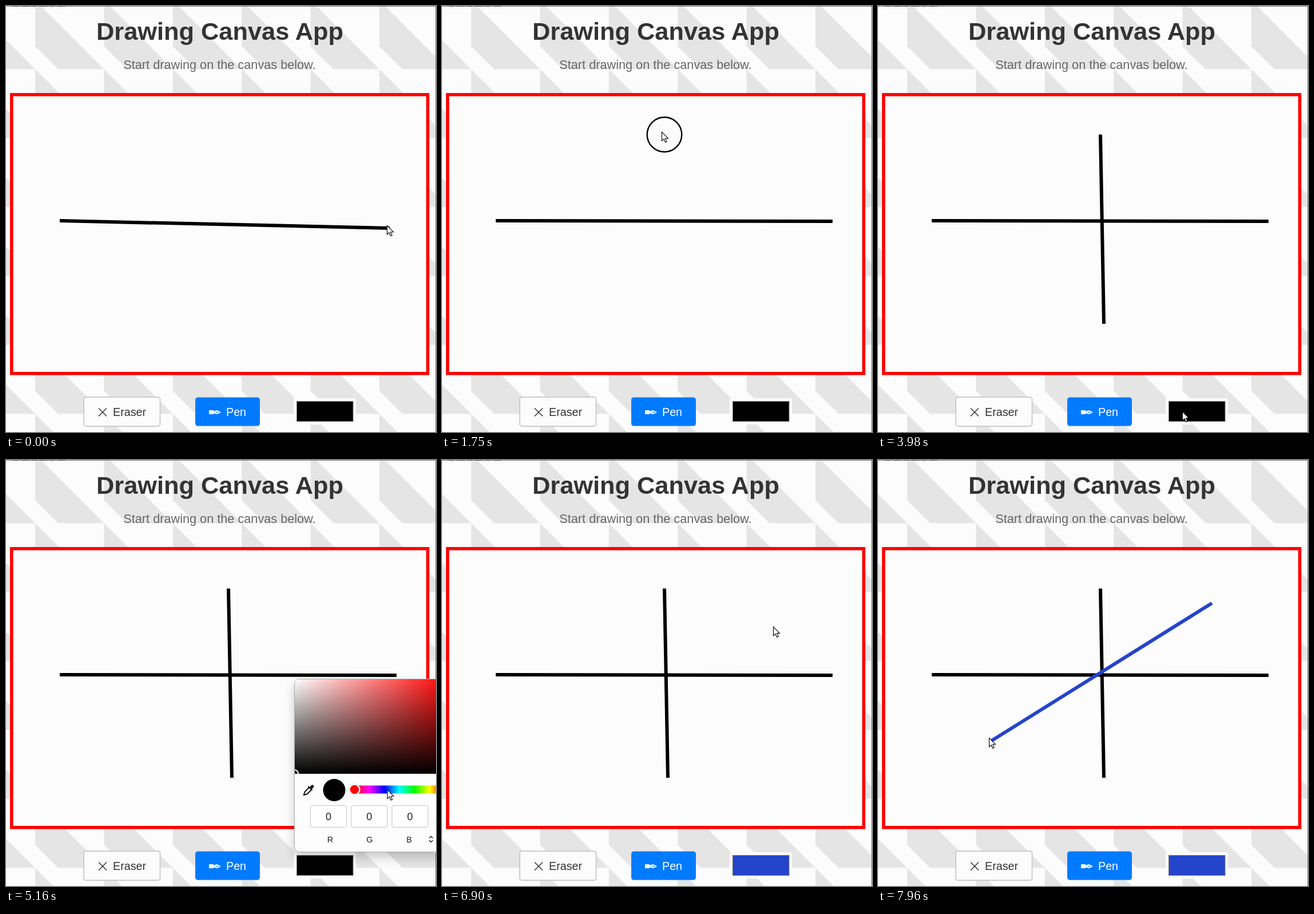
Animation, 752 px wide and 744 px high, one loop 8000 ms. Source, as an HTML page:

```html
<!DOCTYPE html>
<html lang="en">
<head>
<meta charset="utf-8">
<title>Drawing Canvas App</title>
<style>
  html, body { margin: 0; width: 100%; height: 100%; overflow: hidden; background: #fcfcfc; }
  svg { display: block; width: 100vw; height: 100vh; font-family: "Liberation Sans", Arial, sans-serif; }
  .mid { text-anchor: middle; }
  .stroke { fill: none; stroke: #000; stroke-width: 6; }
  .field { fill: #fff; stroke: #c2c2c2; }
</style>
</head>
<body>
<svg viewBox="0 0 752 744">
  <defs>
    <pattern id="tiles" x="51" y="110.3" width="120.4" height="120.4" patternUnits="userSpaceOnUse">
      <path d="M0 0L120.4 120.4H40.1L0 80.3Z" fill="#e5e5e5"/>
    </pattern>
    <linearGradient id="toWhite">
      <stop stop-color="#fff"/><stop offset="1" stop-color="#fff" stop-opacity="0"/>
    </linearGradient>
    <linearGradient id="toBlack" x2="0" y2="1">
      <stop stop-opacity="0"/><stop offset="1"/>
    </linearGradient>
    <linearGradient id="hues"></linearGradient>
    <clipPath id="shadeClip"><path d="M505 548V391Q505 383 513 383H777V548Z"/></clipPath>
    <filter id="shadow" x="-20%" y="-20%" width="140%" height="140%">
      <feDropShadow dx="0" dy="9" stdDeviation="9" flood-opacity=".2"/>
    </filter>
  </defs>

  <rect width="752" height="744" fill="#fcfcfc"/>
  <rect width="752" height="744" fill="url(#tiles)"/>
  <path d="M0 .5H752M751.5 0V744" stroke="#777"/>
  <path d="M12 .5H105" stroke="#333" stroke-dasharray="9 5 14 4"/>
  <text class="mid" x="374" y="59" font-size="43.35" font-weight="700" fill="#333">Drawing Canvas App</text>
  <text class="mid" x="373.5" y="110" font-size="21.7" fill="#666">Start drawing on the canvas below.</text>

  <rect x="9.8" y="154.8" width="727.8" height="487" fill="#fcfcfc" stroke="#f00" stroke-width="5.6"/>
  <path id="across" class="stroke"/>
  <path id="down" class="stroke"/>
  <path id="slant" class="stroke" style="stroke:#2444cb"/>

  <g font-size="19.7">
    <rect x="136" y="683" width="133.5" height="51" rx="4" fill="#fcfcfc" stroke="#ccc" stroke-width="2"/>
    <path d="M162 702.5l14 14m0-14l-14 14" stroke="#333" stroke-width="1.5"/>
    <text x="187" y="716" fill="#333">Eraser</text>
    <rect x="331" y="683.5" width="113" height="50" rx="4.5" fill="#007bff"/>
    <path d="M355 706H363V708L368 706Q373 707 376 709.5Q373 712 368 713L363 711V713H355Z" fill="#fff"/>
    <path d="M367 709.5H373" stroke="#007bff"/>
    <text x="385" y="716" fill="#fff">Pen</text>
  </g>
  <rect x="503" y="685" width="109" height="46" rx="4" fill="#fcfcfc"/>
  <rect id="swatch" x="508.5" y="690.5" width="98.5" height="35" stroke="#767676"/>

  <g id="picker">
    <rect x="504.5" y="382.5" width="273" height="302" rx="9" fill="#fdfdfd" stroke="#aaa" filter="url(#shadow)"/>
    <g clip-path="url(#shadeClip)">
      <rect id="shade" x="505" y="383" width="272" height="165"/>
      <rect x="505" y="383" width="272" height="165" fill="url(#toWhite)"/>
      <rect x="505" y="383" width="272" height="165" fill="url(#toBlack)"/>
      <circle id="shadeKnob" r="7" stroke="#fff" stroke-width="2"/>
    </g>
    <path d="M521 585l1.5-5.5 8-8 4 4-8 8zM528.5 570l7 7" fill="none" stroke="#111" stroke-width="2"/>
    <path d="M531 572l3-4q3-2 4 1 1 2-1 3.5l-3 3z" fill="#111"/>
    <circle id="preview" cx="574" cy="576.5" r="19.5"/>
    <rect x="609.5" y="568.5" width="157" height="14" rx="2" fill="url(#hues)"/>
    <circle id="hueEdge" cy="575.5"/>
    <circle id="hueKnob" cy="575.5" r="8.8" stroke="#fff" stroke-width="2"/>
    <g id="fields" class="mid" fill="#222"></g>
    <path d="M740 660.5l3.2-3.2 3.2 3.2M740 664l3.2 3.2 3.2-3.2" fill="none" stroke="#222" stroke-width="1.4"/>
  </g>

  <circle id="ring" r="30.3" fill="none" stroke="#000" stroke-width="2.4"/>
  <path id="cursor" d="M0 0V15.5L3.6 12.2L6 18L8.6 16.9L6.2 11.2H11Z" fill="#fff" stroke="#000" stroke-width="1.1"/>
</svg>
<script>
const LOOP = 8000, TICK = 130;
const $ = id => document.getElementById(id);
const set = (id, attrs) => { for (const k in attrs) $(id).setAttribute(k, attrs[k]); };
const show = (id, on) => $(id).style.display = on ? '' : 'none';
const within = (t, from, to) => t >= from && t < to;
const smooth = u => u * u * (3 - 2 * u);

const acrossEnd = [683, 376], downStart = [389, 224.5], downEnd = [395, 555];
const slantStart = [584, 250], slantEnd = [199, 490];

// Pointer legs: start time, end time, destination.
const legs = [
  [0, 650, acrossEnd],
  [910, 1170, [340, 228]], [1170, 1600, downStart],
  [1750, 2670, downEnd],
  [3200, 3980, [537, 713]], [3980, 4110, [640, 600]],
  [4130, 4650, [660, 548]], [4650, 5040, [671.5, 580.5]],
  [5300, 5550, [720, 416]], [5550, 5940, [733.5, 422]],
  [6230, 6490, [584, 312]], [6650, 7040, slantStart],
  [7290, 7890, slantEnd]
];
const strokes = [
  { id: 'across', start: [94, 375], end: acrossEnd, from: 0, to: 910 },
  { id: 'down', start: downStart, end: downEnd, from: 1880, to: 3200 },
  { id: 'slant', start: slantStart, end: slantEnd, from: 7420, to: LOOP }
];
// A ring marks each press and release on the canvas.
const rings = [[780, 1040, acrossEnd], [1750, 1890, downStart], [3200, 3330, downEnd], [7160, 7570, slantStart]];

$('hues').innerHTML = ['#f00', '#f0f', '#00f', '#0ff', '#0f0', '#ff0', '#f00']
  .map((c, i) => `<stop offset="${i / 6}" stop-color="${c}"/>`).join('');
$('fields').innerHTML = [...'RGB'].map((name, i) => {
  const x = 532.5 + 71.3 * i;
  return `<rect class="field" x="${x}" y="603.5" width="63" height="38" rx="3"/>
    <text id="value${i}" x="${x + 31.5}" y="629" font-size="18"></text>
    <text x="${567 + 69 * i}" y="668" font-size="14.5">${name}</text>`;
}).join('');

function pointerAt(t) {
  const i = legs.findLastIndex(leg => leg[0] <= t);
  const [start, end, dest] = legs[i];
  const origin = i ? legs[i - 1][2] : [671, 388];
  const elapsed = Math.floor((t - start) / TICK) * TICK;
  const u = smooth(Math.min(1, elapsed / (end - start)));
  return origin.map((o, k) => o + (dest[k] - o) * u);
}

function render(t) {
  const pointer = pointerAt(t);
  for (const { id, start, end, from, to } of strokes) {
    show(id, t >= from);
    set(id, { d: `M${start}L${t < to ? pointer : end}` });
  }

  const blue = t >= 5300, picked = t >= 6100, focused = blue && !picked;
  const hue = blue ? '#03f' : '#f00', hueX = blue ? 666.5 : 609.5;
  const colour = picked ? '#2444cb' : '#000';
  show('picker', within(t, 4130, 6780));
  set('shade', { fill: hue });
  set('shadeKnob', { cx: picked ? 729 : 504, cy: picked ? 417 : 548, fill: colour });
  set('hueKnob', { cx: hueX, fill: hue });
  set('hueEdge', { cx: hueX, r: focused ? 11.5 : 10.3, fill: focused ? '#000' : '#ccc' });
  set('preview', { fill: focused ? '#06080c' : colour });
  set('swatch', { fill: colour });
  [36, 68, 203].forEach((v, i) => $('value' + i).textContent = picked ? v : 0);

  const ring = rings.find(([from, to]) => within(t, from, to));
  show('ring', ring);
  if (ring) set('ring', { cx: ring[2][0], cy: ring[2][1] });
  set('cursor', { transform: `translate(${pointer.map(v => v - 4.5)})` });
}

const begin = performance.now();
(function tick() {
  render((performance.now() - begin) % LOOP);
  requestAnimationFrame(tick);
})();
</script>
</body>
</html>
```
